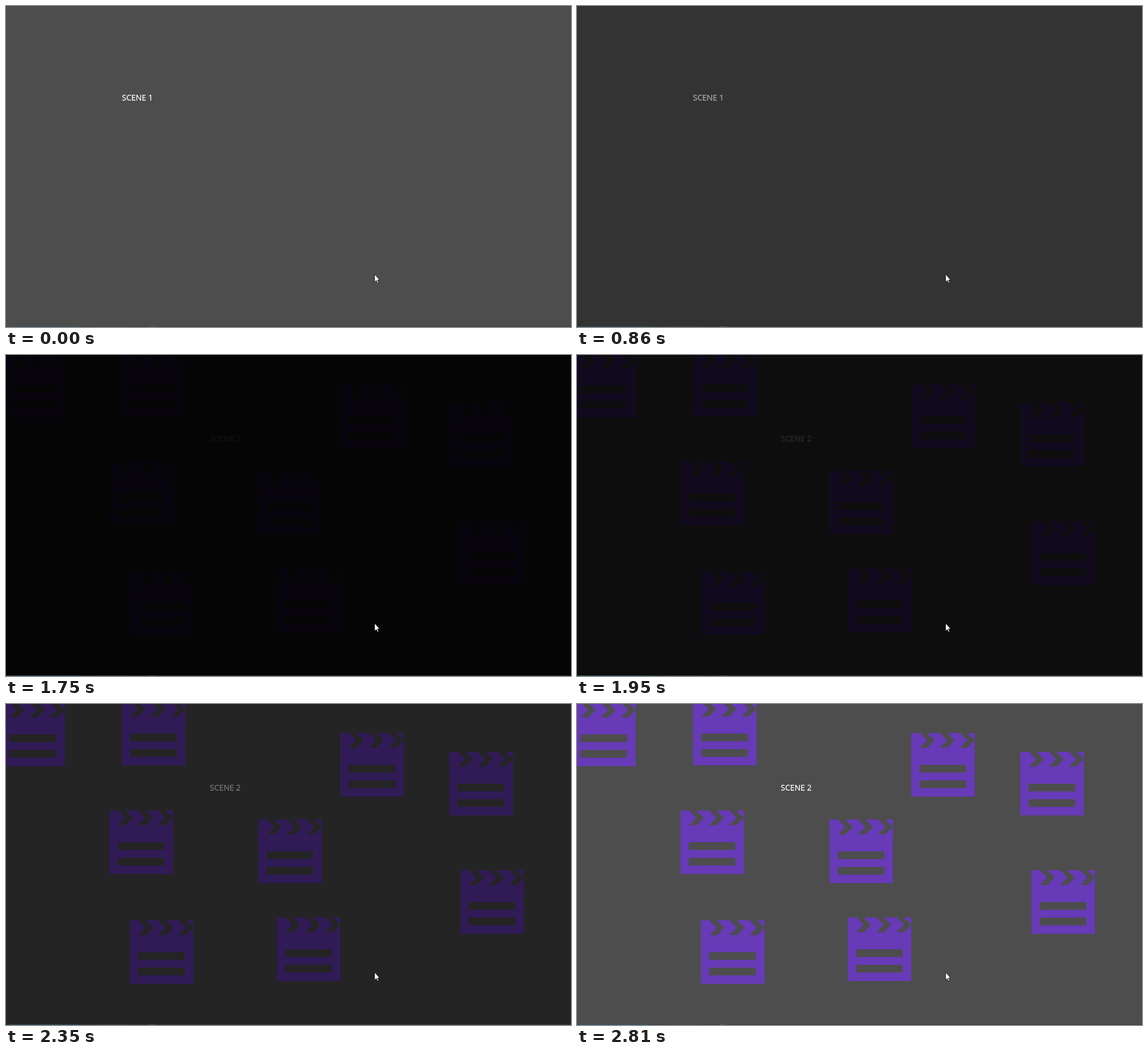
Recreate the animation shown at these times as an HTML page. Size 994 px wide and 564 px high, loop 3610 ms.

```html
<!DOCTYPE html>
<html lang="en">
<head>
<meta charset="utf-8">
<title>Scene fade</title>
<style>
html, body { margin: 0; width: 100%; height: 100%; overflow: hidden; background: #000; }
svg { display: block; width: 994px; height: 564px; }
text { font: 400 14px "Open Sans", "Noto Sans", sans-serif; fill: #fff; stroke: #fff; stroke-width: .25; }
</style>
</head>
<body>
<svg viewBox="0 0 994 564" xmlns="http://www.w3.org/2000/svg">
  <defs>
    <path id="clap" fill="#673ab7" fill-rule="evenodd"/>
  </defs>
  <rect width="994" height="564" fill="#4d4d4d"/>
  <g id="one"><text x="204" y="166">SCENE 1</text></g>
  <g id="two"><g id="icons"></g><text x="358.5" y="152">SCENE 2</text></g>
  <rect id="shade" width="994" height="564"/>
  <!-- sliver of the desktop below the window -->
  <rect y="563" width="994" height="1" fill="#3d3c40"/>
  <path d="M5 563.5H128" stroke="#2c5868"/>
  <path d="M160 563.5H214" stroke="#434a4e"/>
  <path d="M251 563.5H263" stroke="#4a6068"/>
  <path d="M648.5 471.5v13.5l3-2.8 2 4.4 2-.9-2-4.3h3.9z" fill="#fff" stroke="#111" stroke-width=".8"/>
</svg>
<script>
const LOOP = 3610, CUT = 1500;
const $ = id => document.getElementById(id);

// Clapperboard with three chevrons and two slots cut out
const chevron = i => `M${15 + 35.3 * i} 0h13l13 13-13 13h-13l13-13z`;
const slot = i => `M14.5 ${56 + 27.3 * i}h82v13.5h-82z`;
$("clap").setAttribute("d", "M0 0H111.7V111.7H0z" +
  [0, 1, 2].map(chevron).join("") + [0, 1].map(slot).join(""));

const spots = [[-8.5, -2.5], [204, -4], [588, 51], [780, 84], [182, 187],
  [444, 203], [799.5, 292], [218, 380], [476.5, 375]];
$("icons").innerHTML = spots.map(([x, y]) => `<use href="#clap" x="${x}" y="${y}"/>`).join("");

// Share of quadratic fade done at t
const ease = (t, from, span) => (Math.max(0, t - from) / span) ** 2;

// Darkens in equal time steps
function fadeOut(t) {
  const step = 76, start = 400;
  if (t < start) return 1;
  const snapped = start + Math.floor((t - start) / step) * step;
  return Math.max(0, 1 - ease(snapped, 250, 1045));
}

// Brightens in equal light steps
function fadeIn(t) {
  const step = 0.1, first = 0.07;
  const n = Math.floor((ease(t, 1360, 1400) - first) / step);
  return n < 0 ? 0 : Math.min(1, first + n * step);
}

function draw(t) {
  const before = t < CUT;
  $("one").style.display = before ? "" : "none";
  $("two").style.display = before ? "none" : "";
  $("shade").setAttribute("opacity", 1 - (before ? fadeOut(t) : fadeIn(t)));
}

const start = performance.now();
function frame() {
  draw((performance.now() - start) % LOOP);
  requestAnimationFrame(frame);
}
frame();
</script>
</body>
</html>
```
